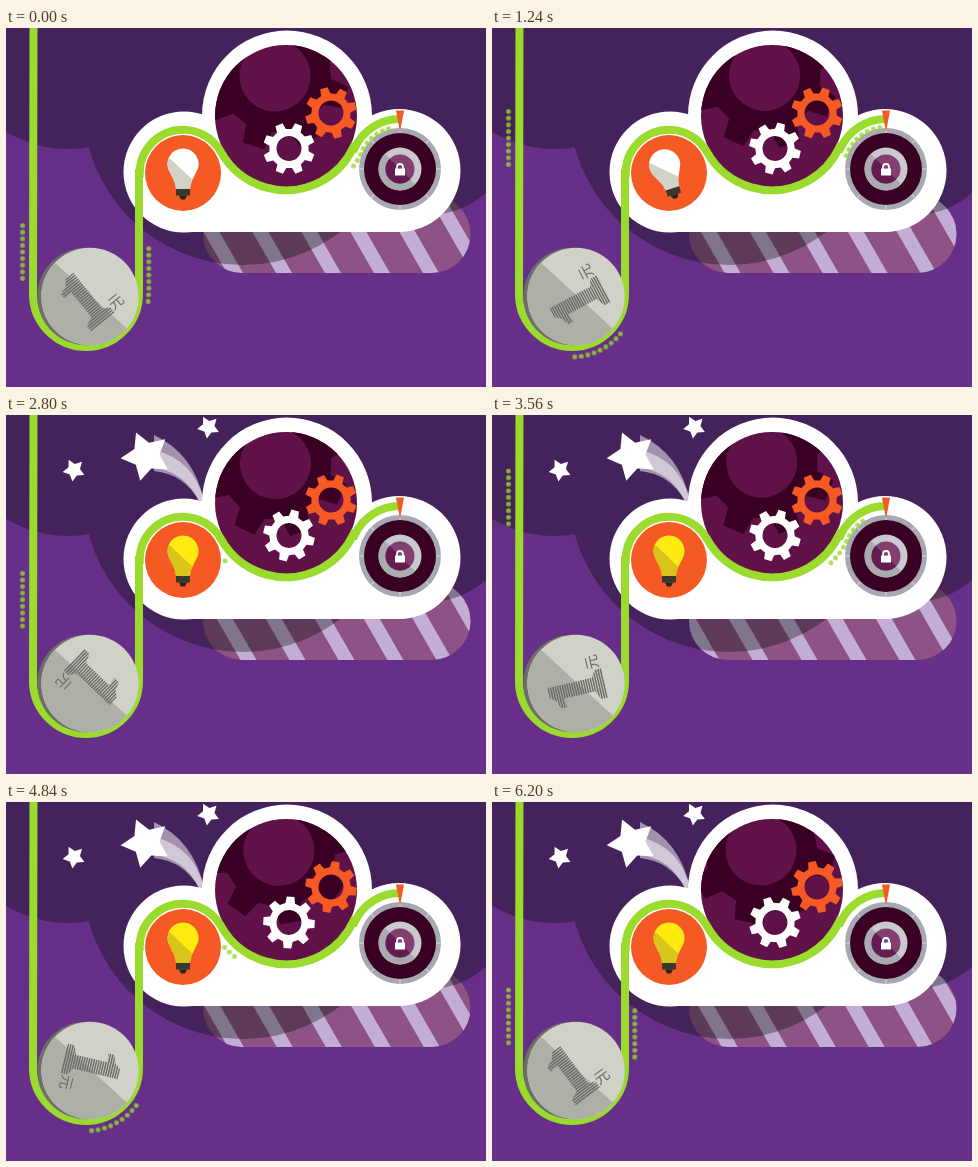
An HTML page with a canvas that plays this animation: 480 by 359 pixels, repeating every 6.24 s.

```html
<!DOCTYPE html>
<html lang="zh">
<head>
<meta charset="utf-8">
<title>Cloud belt</title>
<style>
html, body { margin: 0; width: 100%; height: 100%; overflow: hidden; background: #672f8a; }
canvas { display: block; width: 100vw; height: 100vh; }
</style>
</head>
<body>
<canvas id="stage"></canvas>
<script>
const W = 480, H = 359, LOOP = 6240, TAU = Math.PI * 2;
const canvas = document.getElementById('stage');
const ctx = canvas.getContext('2d');
const ratio = window.devicePixelRatio || 1;
canvas.width = W * ratio;
canvas.height = H * ratio;

const DARK = '#390024', PLUM = '#601148', GREEN = '#9adb2d', ORANGE = '#f55a24';
const COIN = { x: 84, y: 268.5, r: 48.7 };
const BULB = { x: 177, y: 145, r: 38 };
const HUB = { x: 280, y: 88, r: 71 };
const DIAL = { x: 394, y: 141 };
const rad = d => d * Math.PI / 180;
const clamp = v => Math.max(0, Math.min(1, v));
const mix = (a, b, p) => a + (b - a) * p;
const easeOut = p => 1 - (1 - p) * (1 - p);

function disc(x, y, r, color) {
  ctx.beginPath();
  ctx.arc(x, y, r, 0, TAU);
  ctx.fillStyle = color;
  ctx.fill();
}

function poly(points, color) {
  ctx.beginPath();
  points.forEach(p => ctx.lineTo(p[0], p[1]));
  ctx.closePath();
  ctx.fillStyle = color;
  ctx.fill();
}

function within(x, y, deg, draw) {
  ctx.save();
  ctx.translate(x, y);
  ctx.rotate(rad(deg));
  draw();
  ctx.restore();
}

// Background
function shadowPill(t) {
  ctx.save();
  ctx.beginPath();
  ctx.roundRect(197, 167, 267.5, 78, 39);
  ctx.clip();
  ctx.fillStyle = '#8d5384';
  ctx.fillRect(190, 160, 290, 90);
  const period = 49, wide = 16, shift = (t * 0.0302) % period;
  for (let x = 188 - shift; x < 560; x += period) {
    poly([[x - wide, 245], [x, 245], [x - 46, 165], [x - 46 - wide, 165]], '#c4add5');
  }
  ctx.restore();
}

function darkCloud() {
  ctx.beginPath();
  for (const [x, y, r] of [[62, 1, 120], [237, 77, 160], [422, 100, 87]]) {
    ctx.moveTo(x + r, y);
    ctx.arc(x, y, r, 0, TAU);
  }
  ctx.rect(0, 0, W, 32);
  ctx.rect(422, 0, 58, 150);
  ctx.fillStyle = 'rgba(0,10,0,.34)';
  ctx.fill();
}

function whiteCloud() {
  disc(178, 144, 60.5, '#fff');
  disc(393, 142.5, 61.5, '#fff');
  disc(281, 87.5, 85, '#fff');
  ctx.fillRect(178, 120, 215, 84);
}

// Stars
function star(x, y, r, deg) {
  const pts = [];
  for (let i = 0; i < 10; i++) {
    const a = rad(deg + i * 36), q = i % 2 ? r * 0.53 : r;
    pts.push([x + q * Math.cos(a), y + q * Math.sin(a)]);
  }
  poly(pts, '#fff');
}

// Tail from a star to the cloud; its mouth turns as the star's course bends
function band(x, y, p, top, bottom, alpha) {
  const a = rad(90 * (1 - p)), c = Math.cos(a), s = Math.sin(a);
  const mouth = v => [x + 8 * p - v * s, y + v * c];
  ctx.beginPath();
  ctx.moveTo(...mouth(top));
  ctx.quadraticCurveTo(mix(198, x + 48, p), mix(65, y + top * 0.4 + 6, p), 198, 86);
  ctx.lineTo(193, 86);
  ctx.quadraticCurveTo(mix(180, x + 38, p), mix(72, y + bottom + 3, p), ...mouth(bottom));
  ctx.closePath();
  ctx.fillStyle = `rgba(255,255,255,${alpha})`;
  ctx.fill();
}

function stars(t) {
  const a = clamp((t - 1960) / 140), b = clamp((t - 2200) / 160);
  if (a > 0) star(68, 55, 11.5 * a, -118);
  if (b > 0) star(202.5, 12, 11.5 * b, -118);
  if (t < 2000) return;
  const p = easeOut(clamp((t - 2000) / 500)), q = 1 - p;
  const x = q * q * 196 + 2 * p * q * 192 + p * p * 140;
  const y = q * q * 87 + 2 * p * q * 38 + p * p * 41;
  band(x, y, p, -21, 15, 0.5);
  band(x, y, p, -6, 12, 0.5);
  star(x, y, 25.5, mix(-53, -113, p));
}

// Gears
function gear(x, y, r, deg, color) {
  within(x, y, deg, () => {
    ctx.beginPath();
    for (let i = 0; i < 8; i++) {
      for (const [da, k] of [[-14, 0.76], [-8.5, 1], [8.5, 1], [14, 0.76]]) {
        const a = rad(i * 45 + da);
        ctx.lineTo(r * k * Math.cos(a), r * k * Math.sin(a));
      }
    }
    ctx.closePath();
    ctx.moveTo(r * 0.48, 0);
    ctx.arc(0, 0, r * 0.48, 0, TAU);
    ctx.fillStyle = color;
    ctx.fill('evenodd');
  });
}

function hub(t) {
  const turn = t / 3120 * 360, a = rad(turn + 180);
  ctx.save();
  disc(HUB.x, HUB.y, HUB.r, PLUM);
  ctx.clip();
  gear(271 + 2 * Math.cos(a), 48 + Math.sin(a), 74, turn + 17, DARK);
  ctx.restore();
  gear(325, 85, 26, -turn - 16, ORANGE);
  gear(283, 120.5, 26, -turn + 22, '#fff');
}

// Bulb
function bulbShape() {
  ctx.beginPath();
  ctx.arc(0, -14, 15.5, rad(150), rad(30));
  ctx.bezierCurveTo(10, 1, 7.5, 4, 7, 11);
  ctx.lineTo(-7, 11);
  ctx.bezierCurveTo(-7.5, 4, -10, 1, -13.4, -6.2);
  ctx.closePath();
}

function bulb(t) {
  const lit = t >= 1700;
  const tilt = t > 700 && t < 1420 ? 18 * Math.sin((t - 700) / 720 * TAU) : 0;
  disc(BULB.x, BULB.y, BULB.r, ORANGE);
  within(BULB.x, 150, tilt, () => {
    ctx.save();
    bulbShape();
    ctx.fillStyle = lit ? '#ffeb12' : '#fff';
    ctx.fill();
    ctx.clip();
    poly([[-18, -24], [12, 4], [12, 14], [-18, 14]], lit ? '#d8c51b' : '#d2d3c8');
    ctx.restore();
    ctx.fillStyle = '#38382f';
    ctx.fillRect(-7, 11, 14, 6.5);
    poly([[-4, 17.5], [4, 17.5], [2, 21.5], [-2, 21.5]], '#24241f');
  });
}

// Dial
function dial() {
  const { x, y } = DIAL;
  disc(x, y, 41, '#a6a8b2');
  ctx.strokeStyle = '#c9cad0';
  ctx.lineWidth = 1.5;
  for (let i = 0; i < 8; i++) {
    const c = Math.cos(i * TAU / 8), s = Math.sin(i * TAU / 8);
    ctx.beginPath();
    ctx.moveTo(x + 35 * c, y + 35 * s);
    ctx.lineTo(x + 41 * c, y + 41 * s);
    ctx.stroke();
  }
  disc(x, y, 36, DARK);
  disc(x, y, 21.5, '#c9cacd');
  ctx.beginPath();
  ctx.arc(x, y, 21.5, rad(45), rad(225));
  ctx.fillStyle = '#a9abb0';
  ctx.fill();
  disc(x, y, 14.5, '#833f70');
  ctx.beginPath();
  ctx.arc(x, y, 14.5, rad(45), rad(225));
  ctx.fillStyle = '#641c50';
  ctx.fill();
  ctx.fillStyle = '#fff';
  ctx.fillRect(x - 5, y - 0.5, 10, 7);
  ctx.beginPath();
  ctx.arc(x, y - 2, 3, Math.PI, 0);
  ctx.lineTo(x + 3, y);
  ctx.moveTo(x - 3, y - 2);
  ctx.lineTo(x - 3, y);
  ctx.strokeStyle = '#fff';
  ctx.lineWidth = 1.8;
  ctx.stroke();
}

// Belt
function belt() {
  ctx.beginPath();
  ctx.moveTo(27.5, -5);
  ctx.lineTo(27, 266);
  ctx.arc(80, 266, 53, Math.PI, 0, true);
  ctx.lineTo(133, 145);
  ctx.arc(BULB.x, BULB.y, 43.3, Math.PI, rad(-29));
  ctx.arc(HUB.x, HUB.y, 74.3, rad(151), rad(24.9), true);
  ctx.arc(DIAL.x, DIAL.y, 50, rad(204.9), rad(270));
  ctx.strokeStyle = GREEN;
  ctx.lineWidth = 8;
  ctx.stroke();
}

// Place on the dots' track, s pixels from its start above the dial
const around = (c, r, deg) => [c.x + r * Math.cos(rad(deg)), c.y + r * Math.sin(rad(deg))];
const deg = (s, r) => s / r * 180 / Math.PI;

function track(s) {
  if (s < 47.7) return around(DIAL, 42, -90 - deg(s, 42));
  if (s < 230.4) return around(HUB, 84, 24.9 + deg(s - 47.7, 83));
  if (s < 443.6) return [142.8, 145 + s - 322.6];
  if (s < 641.5) return around({ x: 79.6, y: 266 }, 63, deg(s - 443.6, 63));
  return [16.5, 266 - (s - 641.5)];
}

const shown = s => (s > 0 && s < 213) || (s > 381 && s < 890);

function dots(t) {
  const early = t < 660;
  const heads = early ? [683.5, 424.6, 38] : [797.5, 513, 26, -261];
  const run = 0.1345 * (early ? t : t - 1240);
  for (const h of heads) {
    for (let i = 0; i < 9; i++) {
      const s = h + run + (i - 4) * 6.6;
      if (!shown(s)) continue;
      const [x, y] = track(s);
      disc(x, y, 2.6, 'rgba(148,214,42,.62)');
      disc(x, y, 1.4, 'rgba(154,219,45,.6)');
    }
  }
}

// Coin
function coinAngle(t) {
  return t < 1240 ? 10 + t * 281 / 1240 : 291 + (t - 1240) * 0.1615;
}

function coin(t) {
  const { x, y, r } = COIN;
  disc(x - 4, y, r, '#6d6e69');
  disc(x, y, r, '#d1d2c7');
  ctx.beginPath();
  ctx.arc(x, y, r, rad(41), rad(224));
  ctx.fillStyle = '#aeb0a8';
  ctx.fill();
  within(x, y, coinAngle(t) - 49, () => {
    ctx.fillStyle = '#6c6d68';
    ctx.font = '15px "Noto Sans CJK SC", "Noto Sans CJK", sans-serif';
    ctx.textAlign = 'center';
    ctx.textBaseline = 'middle';
    ctx.fillText('元', 17, 20);
    ctx.beginPath();
    for (const [px, py] of [[-8, -29], [2, -29], [2, 17], [9, 21], [9, 28], [-21, 28],
      [-21, 21], [-12, 17], [-12, -15], [-21, -14], [-21, -20], [-13, -23]]) ctx.lineTo(px, py);
    ctx.closePath();
    ctx.clip();
    for (let ly = -29; ly < 29; ly += 2.4) ctx.fillRect(-24, ly, 36, 1.5);
  });
}

function render(t) {
  ctx.setTransform(ratio, 0, 0, ratio, 0, 0);
  ctx.fillStyle = '#672f8a';
  ctx.fillRect(0, 0, W, H);
  shadowPill(t);
  darkCloud();
  stars(t);
  whiteCloud();
  hub(t);
  bulb(t);
  dial();
  belt();
  dots(t);
  coin(t);
  poly([[390, 82.5], [398, 82.5], [394, 104]], ORANGE);
}

const start = performance.now();
function tick() {
  const t = (performance.now() - start) % LOOP;
  render(Math.floor(t / 40) * 40);
  requestAnimationFrame(tick);
}
tick();
</script>
</body>
</html>
```
